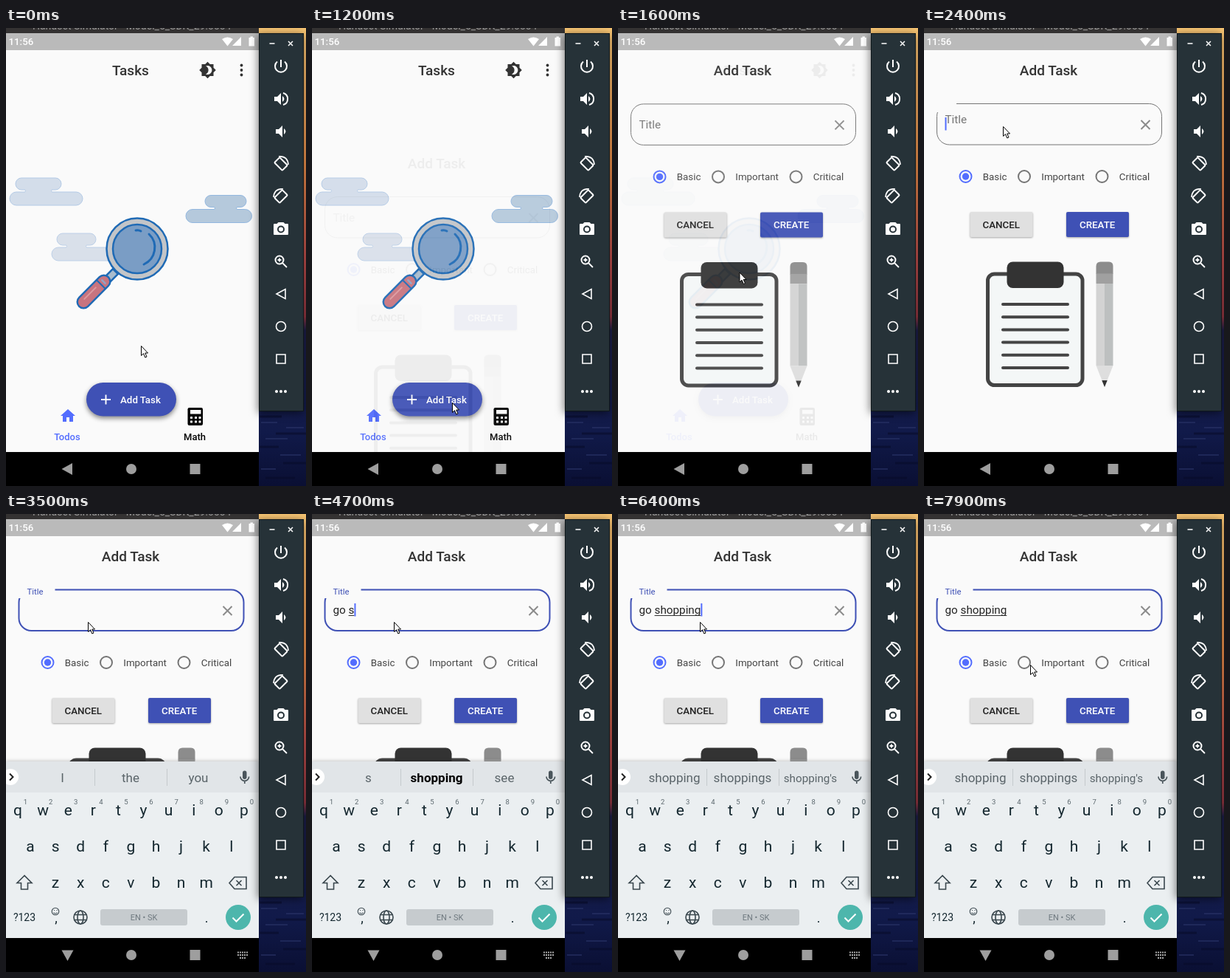
An HTML page for the animation above (8000 ms loop, 407 by 620 pixels).

```html
<!DOCTYPE html>
<html lang="en">
<head>
<meta charset="utf-8">
<title>Adding a task</title>
<style>
  html, body { margin: 0; width: 100%; height: 100%; overflow: hidden; background: #000; }
  svg { display: block; width: 407px; height: 620px; font-family: Roboto, sans-serif; }
  text { white-space: pre; }
  .mid { text-anchor: middle; }
  .med { font-weight: 500; }
  .line { fill: none; stroke-width: 2; }
  .raised { filter: drop-shadow(0 1px 1px #0005); }
</style>
</head>
<body>
<svg viewBox="0 0 407 620">
  <defs>
    <linearGradient id="sky" x2="0" y2="1">
      <stop offset="0" stop-color="#f6c473"/><stop offset=".3" stop-color="#e48a48"/>
      <stop offset=".5" stop-color="#b84c49"/><stop offset=".63" stop-color="#8c343f"/>
      <stop offset=".66" stop-color="#1b1d46"/><stop offset=".88" stop-color="#111a4a"/>
      <stop offset="1" stop-color="#0a0f33"/>
    </linearGradient>
    <clipPath id="screen"><path d="M0 30H343V574H0z"/></clipPath>
  </defs>

  <path fill="url(#sky)" d="M343 0h64v620h-64z"/>
  <path stroke="#2a3468" stroke-width="2" opacity=".6" d="M346 534h22M380 541h24M352 556h30M372 578h28M346 597h20"/>
  <path stroke="#080c2a" stroke-width="3" opacity=".6" d="M344 526h30M366 549h41M344 567h26M376 589h31M352 609h40"/>
  <path fill="#343232" d="M0 0h343v8H0z"/>
  <text x="36" y="2" font-size="14" fill="#999">Handset Simulator - Model_5_SDK_29:5554</text>
  <path fill="#fafafa" d="M0 8h343v566H0z"/>
  <path fill="#bababa" d="M0 7h343v23H0z"/>
  <g fill="#fff">
    <text class="med" x="3.5" y="23" font-size="13.3">11:56</text>
    <path d="M293 15q7.500-5 15 0l-7.500 9.500zM319 12v12h-12zM329.500 13h2v-1.500h3.500v1.500h2v11.500h-7.500z"/>
  </g>

  <g clip-path="url(#screen)">
    <g id="home"></g>
    <g id="form"></g>
    <g id="keyboard"></g>
  </g>

  <path d="M0 574h343v46H0z"/>
  <g fill="#9e9e9e">
    <path id="back" d="M-8 0L6.500-8V8z"/>
    <circle cx="170" cy="597" r="7"/>
    <path d="M249.500 590h14v14h-14z"/>
    <path id="switcher" stroke="#aaa" stroke-width="2" stroke-dasharray="2 1" d="M314 593.500h15M314 597h15M317 601h9"/>
  </g>

  <g id="panel"></g>
  <path id="mouse" fill="#fff" stroke="#000" d="M.5.5V13.500L3.500 10.700L5.800 16L8 15L5.700 10H9.500z"/>
</svg>

<script>
const $ = id => document.getElementById(id);
const INDIGO = '#3f51b5', ACCENT = '#536dfe', INK = '#333';

const text = (x, y, size, str, attrs = '') =>
  `<text x="${x}" y="${y}" font-size="${size}" ${attrs}>${str}</text>`;
const rect = (x, y, w, h, r, attrs) =>
  `<rect x="${x}" y="${y}" width="${w}" height="${h}" rx="${r}" ${attrs}/>`;
const circle = (x, y, r, attrs) => `<circle cx="${x}" cy="${y}" r="${r}" ${attrs}/>`;
const path = (d, attrs = '') => `<path d="${d}" ${attrs}/>`;
const place = (x, y, inner, attrs = '', turn = 0) =>
  `<g transform="translate(${x} ${y}) rotate(${turn})" ${attrs}>${inner}</g>`;
const heading = str => text(169, 64, 19.05, str, `class="mid med" fill="${INK}"`);

// A wide pill with a smaller pill (from..to) stacked on it.
function cloud(left, right, from, to, top, fill, stroke) {
  return path(`M${left + 9} ${top + 37}a9 9 0 0 1 0-18H${from + 12}a1.500 1.500 0 0 0 0-3H${from + 8}
    a8 8 0 0 1 0-16H${to - 8}a8 8 0 0 1 0 16h-4a1.500 1.500 0 0 0 0 3H${right - 9}a9 9 0 0 1 0 18z`,
    `fill="${fill}" stroke="${stroke}"`);
}

function magnifier() {
  const grip = rect(-28, -8.5, 56, 17, 8.5, 'fill="#c8747f"') +
    path('M14-8V8', 'stroke-width="2"') +
    path('M-16-2H6', 'stroke="#dc9aa0" stroke-width="2"') +
    path('M19-3v6', 'stroke="#8fa5c8"');
  return `<g stroke="#1f6ab5" stroke-width="2.500" stroke-linecap="round">
    ${path('M145 326l7 7-11 11-7-7z', 'fill="#a9bccd"')}
    ${circle(178, 299, 41.5, 'fill="#c3c5c8"')}
    ${circle(178, 299, 33, 'fill="#7a9dc5"')}
    ${path('M194 279A25 25 0 0 1 187 320M176 274q4-1 7 1', 'fill="none" stroke-width="3"')}
    ${place(119, 357, grip, '', -45)}
  </g>`;
}

function calculator() {
  let keys = path('M250 517h14.500v5.500H250z');
  for (const x of [250, 256, 261.5])
    for (const y of [526, 531.5]) keys += rect(x, y, 3, 3, .5, '');
  return rect(246.5, 514, 20.5, 24, 2.2, '') + `<g fill="#fafafa">${keys}</g>`;
}

$('home').innerHTML =
  heading('Tasks') +
  place(273.5, 57, path('M8-3.300V-8H3.300L0-11.300-3.300-8H-8v4.700L-11.300 0-8 3.300V8h4.700L0 11.300 3.300 8H8V3.300L11.300 0zM-2.500 5.500A6 6 0 0 0-2.500-5.500 6 6 0 1 1-2.500 5.500z'),
    `fill="${INK}" fill-rule="evenodd"`) +
  [50.5, 57, 63.5].map(y => circle(319.5, y, 1.9, `fill="${INK}"`)).join('') +
  cloud(5, 104, 13, 75, 203, '#d3ddea', '#b3cae6') +
  cloud(244, 333.5, 270, 326, 226.5, '#b5c9dc', '#92b7df') +
  cloud(62, 150, 69, 122, 278, '#d9e0ea', '#bdd0e8') +
  magnifier() +
  rect(109, 480, 122, 45.5, 22.7, `fill="${INDIGO}" style="filter:drop-shadow(0 3px 3px #0007)"`) +
  path('M135.500 496.500v13M129 503h13', 'stroke="#fff" stroke-width="1.900"') +
  text(155, 507.5, 13.34, 'Add Task', 'class="med" fill="#fff"') +
  path('M82 533v-6h4v6h5v-8h3l-10-9-10 9h3v8z', `fill="${ACCENT}"`) +
  text(83, 558, 13, 'Todos', `class="mid med" fill="${ACCENT}"`) +
  calculator() +
  text(256, 558, 13, 'Math', 'class="mid med"');

const radio = (x, label, on) =>
  circle(x, 201, 8, `class="line" stroke="${on ? ACCENT : '#757575'}"`) +
  (on ? circle(x, 201, 4.7, `fill="${ACCENT}"`) : '') +
  text(x + 23.3, 206, 13.34, label, 'fill="#444"');

const button = (x, label, fill, color) =>
  rect(x, 249, 85, 34, 2, `class="raised" fill="${fill}"`) +
  text(x + 42.2, 271, 13.34, label, `class="mid med" fill="${color}"`);

const clipboard =
  rect(86.5, 333, 128.5, 150.5, 9, 'fill="#f4f7f7" stroke="#444" stroke-width="5"') +
  rect(112.5, 316.5, 77, 35.5, 8, 'fill="#333"') +
  [0, 1, 2, 3, 4, 5].map(i => path(`M107 ${374 + i * 17.2}h88`, 'stroke="#444" stroke-width="4" stroke-linecap="round"')).join('');

const pencil =
  path('M233.500 333v-10.500q0-6 6-6h11q6 0 6 6v10.500z', 'fill="#8c8c8c"') +
  path('M233.500 332.500h23v13.500h-23z', 'fill="#a0a0a0"') +
  path('M233.500 346h12v111h-12z', 'fill="#d3d3d3"') +
  path('M245 346h11.500v111H245z', 'fill="#bdc0c0"') +
  path('M233.500 457h23L245 486z', 'fill="#dedede"') +
  path('M241.300 477h7.400L245 486z', 'fill="#333"');

$('form').innerHTML =
  path('M0 30h343v544H0z', 'fill="#fafafa"') +
  heading('Add Task') +
  rect(17.5, 102.5, 305, 55.5, 17, 'id="field" fill="none"') +
  '<rect id="notch" x="17" fill="#fafafa"/>' +
  text(28.5, 136, 15.25, 'Title', 'id="label"') +
  text(28.5, 135, 15.25, '', 'id="typed" fill="#222"') +
  path('', 'id="underline" stroke="#333"') +
  path('', `id="caret" stroke="${ACCENT}" stroke-width="2"`) +
  path('M294.500 125l12 12m0-12l-12 12', 'stroke="#8a8a8a" stroke-width="2"') +
  radio(56.5, 'Basic', true) + radio(136, 'Important') + radio(241.5, 'Critical') +
  button(62.5, 'CANCEL', '#e0e0e0', '#222') + button(193, 'CREATE', INDIGO, '#fff') +
  clipboard + pencil;

const keyRow = (letters, x0, y) => [...letters].map((c, i) => text(x0 + i * 34.1, y, 21, c, 'class="mid"')).join('');

$('keyboard').innerHTML =
  path('M0 335h343v239H0z', 'fill="#ebeff1" style="filter:drop-shadow(0 -1px 2px #0003)"') +
  path('M0 335h343v42H0z', 'fill="#e1e5e8"') +
  circle(6, 356, 11, 'fill="#fff"') +
  path('M5 351.500l4.500 4.500-4.500 4.500', 'class="line" stroke="#222"') +
  path('M120.500 345v23M218.500 345v23', 'stroke="#c5cacd"') +
  ['left', 'middle', 'right'].map((id, i) => text([76.5, 169, 261][i], 362.5, 17, '', `id="${id}" class="mid" fill="#5a6469"`)).join('') +
  rect(321, 347.5, 5.5, 11.5, 2.7, 'fill="#4a555b"') +
  path('M318 355.500a5.800 5.800 0 0 0 11.600 0M323.800 361v4', 'fill="none" stroke="#4a555b" stroke-width="1.700"') +
  `<g fill="#14272f">
    ${keyRow('qwertyuiop', 16, 408)}${keyRow('asdfghjkl', 33, 456.5)}${keyRow('zxcvbnm', 67, 505.5)}
    ${[...'1234567890'].map((c, i) => text(26.5 + i * 34.1, 393, 9.5, c, 'class="mid" fill="#5c686e"')).join('')}
    ${text(25, 551, 14, '?123', 'class="mid"')}${text(68, 553, 18, ',', 'class="mid"')}${text(272, 553, 18, '.', 'class="mid"')}
  </g>
  <g fill="none" stroke="#3a474e" stroke-width="1.600">
    ${path('M25 489.500l-10 10h5.500v8.500h9v-8.500h5.500zM310 491.500h16v16h-16l-7-8zM312.500 496l7 7m0-7l-7 7')}
    ${circle(67, 538, 4.8, 'stroke-width="1.100"')}${path('M64.500 539.500q2.500 3 5 0M65 536.500h1M68.500 536.500h1', 'stroke-width="1.100"')}
    ${circle(101, 546, 9, '')}<ellipse cx="101" cy="546" rx="4" ry="9"/>${path('M93 542.500h16M93 549.500h16')}
  </g>` +
  rect(128, 535, 118, 22, 3, 'fill="#c6cbce"') +
  text(187, 550, 11, 'EN • SK', 'class="mid" fill="#707a80"') +
  circle(315, 546, 17, 'fill="#4db6ac"') +
  path('M307.500 546.500l5 5 10-10', 'class="line" stroke="#fff"');

const solid = 'fill="#fff" stroke="none"';
const speaker = x => path(`M${x}-3h4l5-5V8l-5-5h-4zM${x + 11}-4q5 4 0 8z`, solid);
const rotation =
  rect(-5, -7.5, 10, 15, 1, 'transform="rotate(-45)"') + path('M-3-10Q9-11 10 1', 'stroke-width="1.700"');
const tools = [
  path('M0-9V1M-5-6.500A8 8 0 1 0 5-6.500'),
  speaker(-9) + path('M3-8a8.300 8.300 0 0 1 0 16'),
  speaker(-7),
  rotation,
  `<g transform="scale(-1 1)">${rotation}</g>`,
  path('M-3.500-9h7l2 2H9q1 0 1 1V7q0 1-1 1H-9q-1 0-1-1V-6q0-1 1-1h3.500z', solid) + circle(0, 0.5, 4, 'stroke="#263238"'),
  circle(-2, -2, 5.5, '') + path('M2 2l6 6M-2-4.500v5M-4.500-2h5', 'stroke-width="1.800"'),
  path('M-6 0L6-6.500V6.500z', 'stroke-width="1.600"'),
  circle(0, 0, 6.5, 'stroke-width="1.600"'),
  path('M-6-6H6V6H-6z', 'stroke-width="1.600"'),
  [-6, 0, 6].map(x => circle(x, 0, 2, solid)).join(''),
];

$('panel').innerHTML =
  rect(343.5, 7.5, 60, 511, 0, 'fill="#263238" stroke="#10181b" style="filter:drop-shadow(-1px 2px 6px #0008)"') +
  `<g class="line" stroke="#fff">
    ${path('M357.500 21h7M383 18l6 6m0-6l-6 6', 'stroke-width="1.500"')}
    ${tools.map((icon, i) => place(373, 52 + i * 44, icon)).join('')}
  </g>`;

// Tracks: [time, ...values]
const mouseTrack = [[200, 183, 430], [700, 190, 507], [1400, 190, 507], [1800, 139, 154], [2000, 107, 133],
  [3000, 107, 133], [3100, 111, 146], [7100, 111, 146], [7500, 53, 206], [7900, 144, 204]];
const entryTrack = [[1000, 0, 300], [1200, .06, 126], [1300, .45, 30], [1400, .77, 2.5], [1500, .9, .6], [1800, 1, 0]];
const typingTrack = [[0, ''], [4000, 'g'], [4100, 'go'], [4300, 'go '], [4700, 'go s'], [4900, 'go sh'], [5200, 'go sho'],
  [5500, 'go shop'], [5900, 'go shopp'], [6200, 'go shoppi'], [6300, 'go shoppin'], [6400, 'go shopping']];
const hintTrack = [[0, 'I', 'the', 'you'], [4000, 'g', 'good', 'get'], [4100, 'go', 'good', 'going'], [4300, 'to', 'back', 'and'],
  [4700, 's', 'shopping', 'see'], [4900, 'sh', 'shopping', 'shower'], [5300, 'sho', 'shopping', 'shower'],
  [5600, 'shop', 'shopping', "shopping's"], [5900, 'shopp', 'shopping', 'shoppers'], [6200, 'shoppi', 'shopping', "shopping's"],
  [6300, 'shoppin', 'shopping', "shopping's"], [6400, 'shopping', 'shoppings', "shopping's"]];
const caretToggles = [2300, 3500, 3900, 6900, 7400, 7900];

const held = (track, t) => track.filter(k => k[0] <= t).pop().slice(1);
function tween(track, t) {
  const next = track.findIndex(k => k[0] > t);
  if (next < 1) return (next ? track[track.length - 1] : track[0]).slice(1);
  const a = track[next - 1], b = track[next], p = (t - a[0]) / (b[0] - a[0]);
  return a.slice(1).map((v, i) => v + (b[i + 1] - v) * p);
}

const ruler = document.createElement('canvas').getContext('2d');
function widthOf(str) {
  ruler.font = '15.25px Roboto, sans-serif';
  return ruler.measureText(str).width;
}
function set(id, attrs) {
  for (const name in attrs) $(id).setAttribute(name, attrs[name]);
}

function drawField(t) {
  const focused = t >= 3100, lifting = t >= 2300;
  set('field', { stroke: focused ? INDIGO : '#757575', 'stroke-width': focused ? 2 : 1 });
  set('notch', { y: focused ? 97 : 101, height: focused ? 17 : 13, width: focused ? 49.5 : t >= 2400 ? 27 : lifting ? 12 : 0 });
  set('label', {
    y: focused ? 108.5 : t >= 2400 ? 129 : lifting ? 134 : 136,
    'font-size': focused ? 11.4 : 15.25,
    fill: focused ? INDIGO : '#757575',
  });
  const [typed] = held(typingTrack, t);
  const end = 28.5 + widthOf(typed);
  const wordStart = 28.5 + widthOf(typed.slice(0, typed.lastIndexOf(' ') + 1));
  $('typed').textContent = typed;
  set('underline', { d: end > wordStart ? `M${wordStart} 137.500H${end}` : '' });
  const caretOn = caretToggles.filter(k => k <= t).length % 2;
  set('caret', { d: caretOn ? `M${end + 1} 121v17.500` : '' });
}

function drawKeyboard(t) {
  const open = t >= 3100;
  set('keyboard', { visibility: open ? 'visible' : 'hidden' });
  set('switcher', { visibility: open ? 'visible' : 'hidden' });
  set('back', { transform: `translate(83.5 597)${open ? ' rotate(-90)' : ''}` });
  const hints = held(hintTrack, t);
  ['left', 'middle', 'right'].forEach((id, i) => {
    $(id).textContent = hints[i];
    set(id, { 'font-size': hints[i].length > 9 ? 15.2 : 17 });
  });
  const bold = t >= 4000 && t < 6400 && hints[1] !== 'back';
  set('middle', { 'font-weight': bold ? 700 : 400, fill: bold ? '#000' : '#5a6469' });
}

function draw(now) {
  const t = Math.floor(now % 8000 / 100) * 100; // the picture ticks every 100 ms
  const [opacity, shift] = tween(entryTrack, t);
  set('form', { opacity, transform: `translate(0 ${shift})` });
  set('mouse', { transform: `translate(${tween(mouseTrack, t)})` });
  drawField(t);
  drawKeyboard(t);
}

const start = performance.now();
function loop() {
  draw(performance.now() - start);
  requestAnimationFrame(loop);
}
loop();
</script>
</body>
</html>
```
